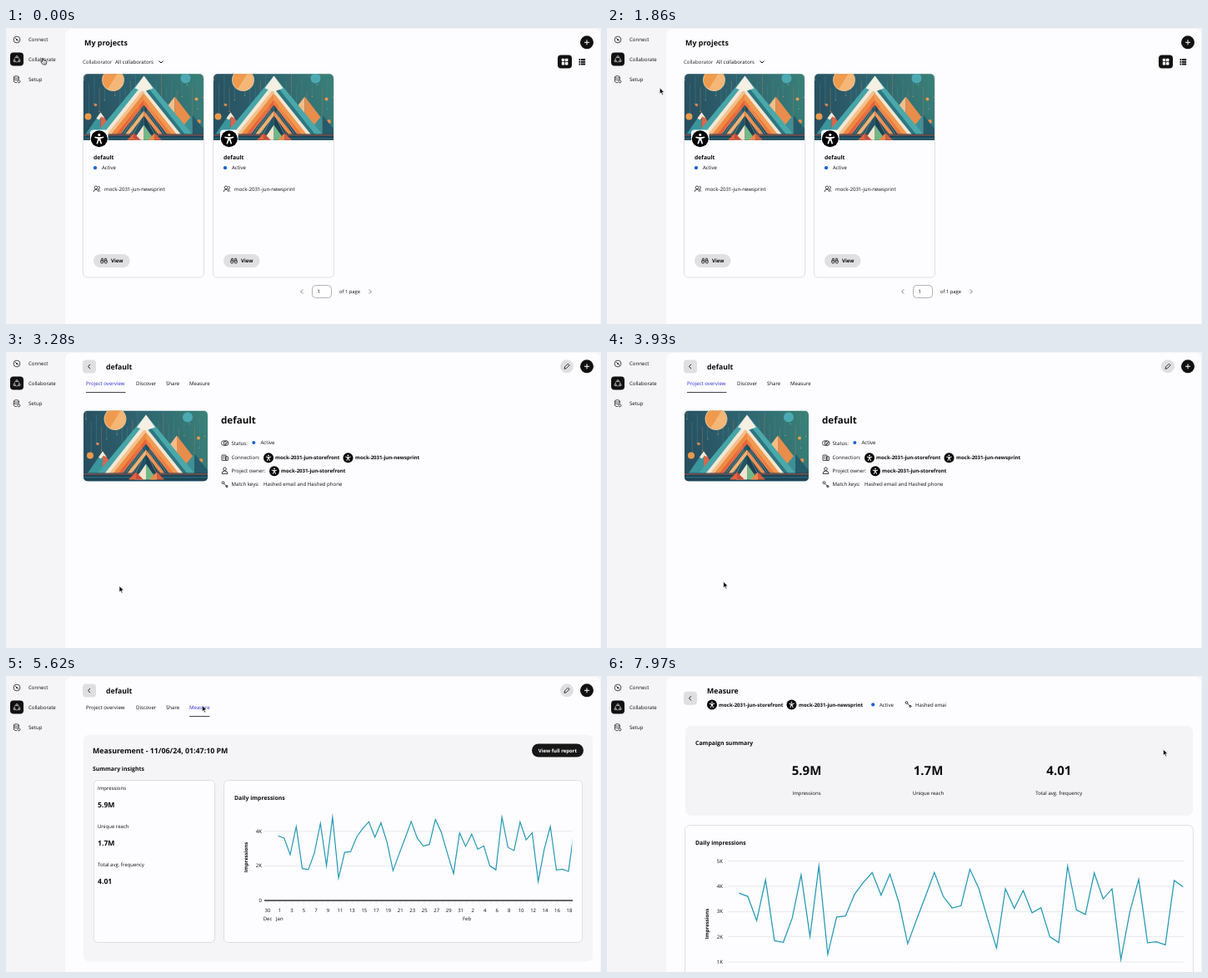
These frames come from a looping animation (714x356 px, 8000 ms). An HTML page with a canvas:

```html
<!DOCTYPE html>
<html lang="en">
<head>
<meta charset="utf-8">
<title>Projects</title>
<style>
html, body { margin: 0; width: 100%; height: 100%; overflow: hidden; background: #f5f4f6; }
canvas { display: block; width: 714px; height: 356px; }
</style>
</head>
<body>
<canvas id="stage"></canvas>
<script>
const LOOP = 8000;
const INK = '#0c0c0c', BLUE = '#2b2bd6', LINE = '#2399b5', DOT = '#1a62d6';
const PUBLISHER = 'mock-2031-jun-newsprint';
const ADVERTISER = 'mock-2031-jun-storefront';

const canvas = document.getElementById('stage');
const ctx = canvas.getContext('2d');
const dpr = window.devicePixelRatio || 1;
canvas.width = 714 * dpr;
canvas.height = 356 * dpr;

// daily impressions, in thousands
const DAILY = [
  3.73, 3.6, 2.64, 4.26, 1.84, 1.78, 2.74, 4.45, 2.02, 4.8, 1.3, 2.78, 2.82,
  3.67, 4.15, 4.54, 3.65, 4.48, 3.37, 1.72, 2.68, 3.6, 4.55, 3.6, 3.14, 3.23,
  4.67, 3.92, 2.7, 1.55, 3.9, 3.12, 3.83, 2.95, 3.15, 2, 1.77, 4.8, 3.06,
  2.88, 4.53, 3.5, 3.9, 1.1, 2.97, 4.27, 1.76, 1.8, 1.68, 4.23, 3.98
];

// ---------- helpers ----------
function text(s, x, cy, size = 6.1, weight = 500, color = INK, align = 'left') {
  ctx.font = `${weight} ${size}px "Open Sans", "Noto Sans", sans-serif`;
  ctx.textRendering = 'geometricPrecision';
  ctx.textAlign = align;
  ctx.fillStyle = color;
  ctx.fillText(s, x, cy + size * 0.357);
}
const bold = (s, x, cy, size = 6.1, color, align) => text(s, x, cy, size, 700, color, align);

function box(x, y, w, h, r, fill, stroke, width = 0.9) {
  ctx.beginPath();
  ctx.roundRect(x, y, w, h, r);
  paint(fill, stroke, width);
}
function disc(x, y, r, fill, stroke, width) {
  ctx.beginPath();
  ctx.arc(x, y, r, 0, Math.PI * 2);
  paint(fill, stroke, width);
}
function paint(fill, stroke, width = 0.8) {
  if (fill) { ctx.fillStyle = fill; ctx.fill(); }
  if (stroke) { ctx.strokeStyle = stroke; ctx.lineWidth = width; ctx.stroke(); }
}
function trace(points, close) {
  ctx.beginPath();
  points.forEach(([x, y], i) => i ? ctx.lineTo(x, y) : ctx.moveTo(x, y));
  if (close) ctx.closePath();
}
function poly(fill, ...points) { trace(points, true); paint(fill); }
function stroke(color, width, ...points) { trace(points); paint(null, color, width); }
function at(x, y, draw) {
  ctx.save();
  ctx.translate(x, y);
  draw();
  ctx.restore();
}

// ---------- icons ----------
function avatar(x, y, r) {
  disc(x, y, r, '#000');
  at(x, y, () => {
    ctx.scale(r / 11.5, r / 11.5);
    ctx.lineCap = ctx.lineJoin = 'round';
    disc(0, -5.4, 1.8, '#fff');
    stroke('#fff', 1.9, [-5.4, -2], [-1.6, -1.2], [1.6, -1.2], [5.4, -2]);
    poly('#fff', [-1.9, -1.8], [1.9, -1.8], [1.9, 2.4], [-1.9, 2.4]);
    stroke('#fff', 1.9, [-1.1, 1.5], [-2.8, 6.3]);
    stroke('#fff', 1.9, [1.1, 1.5], [2.8, 6.3]);
  });
}
function chevron(x, y, dir, color = '#333') {
  stroke(color, 0.9, [x - dir * 1.2, y - 2.6], [x + dir * 1.3, y], [x - dir * 1.2, y + 2.6]);
}
function person(x, y) {
  disc(x, y - 1.7, 1.8, null, INK, 0.8);
  ctx.beginPath();
  ctx.arc(x, y + 4, 3.4, Math.PI, 0);
  ctx.closePath();
  paint(null, INK, 0.8);
}
function people(x, y) {
  disc(x - 1, y - 1.4, 1.8, null, '#222', 0.8);
  ctx.beginPath();
  ctx.arc(x - 1, y + 3.8, 2.9, Math.PI, 0);
  ctx.moveTo(x + 1.6, y - 3);
  ctx.arc(x + 1.7, y - 1.3, 1.7, -1.5, 1.5);
  ctx.lineTo(x + 4, y + 3.4);
  paint(null, '#222', 0.8);
}
function binoculars(x, y) {
  for (const d of [-1, 1]) {
    disc(x + d * 2.3, y + 1.3, 1.6, null, INK, 0.8);
    stroke(INK, 0.8, [x + d * 3.7, y + 0.5], [x + d * 2.7, y - 2.8], [x + d * 1.2, y - 2.8], [x + d * 0.8, y + 1]);
  }
}
function keys(x, y) {
  disc(x - 2, y - 2, 1.4, null, INK, 0.8);
  stroke(INK, 0.8, [x - 1, y - 1], [x + 2.6, y + 2.6]);
  disc(x + 2.5, y + 2.4, 1.1, null, INK, 0.8);
}
function addButton() {
  disc(697, 17.3, 8, '#111');
  stroke('#fff', 1, [694, 17.3], [700, 17.3]);
  stroke('#fff', 1, [697, 14.3], [697, 20.3]);
}
function backButton(y) {
  box(92, y - 8, 16, 16, 4, '#dfdee0');
  chevron(99.8, y, -1, INK);
}
function editButton() {
  disc(673, 17.3, 8, '#dfdee0');
  trace([[670, 20.3], [670.6, 17.9], [674.4, 14.1], [676.2, 15.9], [672.4, 19.7]], true);
  paint(null, INK, 0.8);
}

// ---------- illustration, 149 x 85 ----------
function peak(x, y, half, base, left, right) {
  poly(left, [x, y], [x, base], [x - half, base]);
  poly(right, [x, y], [x + half, base], [x, base]);
}
function artwork(x, y, cropX, cropY, radii) {
  ctx.save();
  ctx.beginPath();
  ctx.roundRect(x + cropX, y + cropY, 149 - cropX * 2, 85 - cropY * 2, radii);
  ctx.clip();
  ctx.translate(x, y);
  const sky = ctx.createLinearGradient(0, 40, 149, 0);
  sky.addColorStop(0, '#274f60');
  sky.addColorStop(0.5, '#2f6570');
  sky.addColorStop(1, '#3a8278');
  ctx.fillStyle = sky;
  ctx.fillRect(0, 0, 149, 85);
  for (let i = 0; i < 24; i++) {
    const lx = 3 + i * 6.2, top = (i * 37) % 23, len = 10 + (i * 29) % 34;
    stroke(i % 3 ? '#4d8b8f' : '#b08058', 0.4, [lx, top], [lx, top + len]);
    disc(lx, top + len, 0.6, i % 2 ? '#e59a62' : '#7cbdbb');
  }
  disc(38, 10, 13.4, '#e9c7a0');
  disc(38, 10, 12.5, '#ef9a4c');
  ctx.beginPath();
  ctx.arc(38, 10, 12.5, -1, 2.1);
  paint('#f4b777');
  disc(125, 8, 6, '#4ca9b3');
  disc(8, 54, 4, '#e99a4c');
  disc(17, 40, 1.8, '#d9844f');
  disc(138, 33, 2, '#e99a4c');
  disc(141, 60, 2.4, '#ec8b4a');

  peak(112, 30, 37, 78, '#f3bd8b', '#e88d4c');
  peak(133, 52, 21, 78, '#3f8f95', '#245c6c');
  peak(23, 49, 20, 78, '#3a959c', '#d9664a');
  poly('#f5e8d8', [23, 49], [28, 56], [24, 54], [21, 58], [18, 56]);

  // nested bands of the main mountain
  peak(75, 5, 62, 80, '#46a5a8', '#4aa8aa');
  peak(75, 13, 53, 80, '#f4e8d6', '#2d7681');
  peak(75, 20, 48, 80, '#f3c08c', '#f4e6d2');
  peak(75, 26, 43, 80, '#ee8a42', '#f09a50');
  peak(75, 34, 37, 80, '#e5623c', '#ed7a40');
  peak(75, 40, 32, 80, '#245a6b', '#1e4c60');
  peak(75, 47, 26, 80, '#f2b376', '#ee8846');
  peak(75, 53, 21, 80, '#215466', '#1b4255');
  poly('#f6efe4', [75, 5], [86, 20], [75, 24], [64, 20]);
  for (let i = 0; i < 6; i++) {
    stroke('#f1b071', 0.4, [47 + i * 3, 76], [69 + i, 42 + i * 2]);
    stroke('#efc69a', 0.4, [103 - i * 3, 76], [81 - i, 42 + i * 2]);
  }
  ctx.fillStyle = '#1e4557';
  ctx.fillRect(0, 75, 149, 10);
  ctx.fillStyle = '#cf5b45';
  ctx.fillRect(0, 76, 149, 0.8);
  ctx.fillStyle = '#3b8890';
  ctx.fillRect(0, 80, 149, 0.7);
  peak(75, 64, 13, 83, '#f2e4d0', '#72b887');
  peak(63, 74, 9, 83, '#e5643f', '#c94e3c');
  peak(88, 74, 9, 83, '#ed8a4b', '#d85e3e');
  ctx.restore();
}

// ---------- pages ----------
function shell() {
  ctx.fillStyle = '#f5f4f6';
  ctx.fillRect(0, 0, 714, 356);
  box(70.6, 0.5, 643, 380, 8, '#fdfcff', '#f0eff1', 0.5);

  disc(13, 14, 3.9, null, '#222', 0.8);
  stroke('#222', 0.8, [10.8, 11.8], [15.2, 16.2]);
  disc(13, 14, 1, '#222');
  text('Connect', 27, 14);

  box(5, 29.5, 16, 16, 4, '#111');
  disc(13, 38, 3.1, null, '#bbb', 0.7);
  for (const [x, y] of [[13, 34.7], [15.9, 39.6], [10.1, 39.6]]) disc(x, y, 1.1, '#111', '#fff', 0.7);
  text('Collaborate', 27, 38);

  ctx.beginPath();
  ctx.ellipse(12.4, 59, 3, 1.3, 0, 0, Math.PI * 2);
  ctx.moveTo(9.4, 59);
  ctx.lineTo(9.4, 64.4);
  ctx.quadraticCurveTo(11, 66, 13, 65.6);
  ctx.moveTo(9.4, 61.8);
  ctx.quadraticCurveTo(12, 63.4, 15.4, 61.8);
  ctx.lineTo(15.4, 59);
  paint(null, '#222', 0.8);
  disc(15.4, 64.4, 1.5, '#f5f4f6', '#222', 0.8);
  text('Setup', 27, 62);
}

function projectCard(x, hover) {
  box(x + 0.5, 55.5, 145, 244.5, 5, '#fdfcff', '#dcdbdf');
  artwork(x - 1.5, 52.5, 2.5, 2.8, [5, 5, 0, 0]);
  box(x + 9, 122.5, 21.5, 21.5, 4, '#fff');
  avatar(x + 19.8, 133.2, 10);
  bold('default', x + 13, 155.5, 6.8);
  disc(x + 15, 168.2, 2.1, DOT);
  text('Active', x + 23, 168.2);
  people(x + 17, 193.3);
  text(PUBLISHER, x + 26, 193.5);
  box(x + 13, 272, 43.5, 16, 8, hover ? '#c6c5c8' : '#e0dfe2');
  binoculars(x + 25.5, 280);
  bold('View', x + 34, 280);
}

function projectsPage(t) {
  bold('My projects', 94, 17.5, 8.95);
  text('Collaborator', 92, 41.2, 6.1, 400, '#222');
  text('All collaborators', 131, 41);
  stroke(INK, 1, [183.6, 39.6], [186, 42], [188.4, 39.6]);
  addButton();

  box(662, 32.5, 17, 16, 4, '#111');
  for (const x of [666.8, 671]) for (const y of [36.8, 41]) box(x, y, 3.4, 3.4, 0.5, '#fff');
  for (const y of [37, 39.8, 42.6]) {
    box(687.5, y, 1.7, 1.9, 0.3, INK);
    box(689.8, y, 5.4, 1.9, 0.3, INK);
  }

  const [cx, cy] = pointer(t);
  projectCard(92, cx > 105 && cx < 148 && cy > 272 && cy < 288);
  projectCard(248, false);

  chevron(355, 317, -1, '#777');
  box(367.5, 309.5, 23, 15, 4, '#fff', '#a0a0a2', 0.8);
  text('1', 373.5, 317.2);
  text('of 1 page', 400, 317.2, 5.8);
  chevron(437, 317, 1, '#777');
}

function projectHeader(active) {
  backButton(17.5);
  bold('default', 120, 17.5, 8.7);
  editButton();
  addButton();
  const tabs = [['Project overview', 96, 143.5], ['Discover', 156, 180], ['Share', 192, 208], ['Measure', 220, 244.3]];
  tabs.forEach(([name, x, end], i) => {
    text(name, x, 37.5, 6.1, 500, i === active ? BLUE : INK);
    if (i === active) {
      ctx.fillStyle = '#4b4b4b';
      ctx.fillRect(x, 48, end - x, 1.1);
    }
  });
}

function overviewPage() {
  projectHeader(0);
  artwork(93, 70.5, 0, 0, 5);
  bold('default', 258, 81.5, 11.6);

  disc(264, 109.6, 2.9, null, INK, 0.8);
  disc(261.4, 109.6, 2.9, null, INK, 0.7);
  stroke(INK, 0.8, [262.6, 109.6], [263.8, 110.8], [265.8, 108.4]);
  text('Status:', 270.5, 110);
  disc(297.3, 109, 2, DOT);
  text('Active', 305.5, 109);

  box(259, 124, 4.8, 6.4, 0.6, null, INK, 0.8);
  box(263.8, 125.8, 2.6, 4.6, 0.4, null, INK, 0.8);
  stroke(INK, 0.7, [260.2, 126], [262.6, 126]);
  stroke(INK, 0.7, [260.2, 128], [262.6, 128]);
  text('Connection:', 270.5, 127.3);
  avatar(315, 127.2, 6);
  bold(ADVERTISER, 323, 127.3);
  avatar(410.5, 127.2, 6);
  bold(PUBLISHER, 419, 127.3);

  person(262.5, 142.4);
  text('Project owner:', 270.5, 143.3);
  avatar(322, 143.2, 6);
  bold(ADVERTISER, 330, 143.3);

  keys(262.5, 159.2);
  text('Match keys:', 270.5, 159.3);
  text('Hashed email and Hashed phone', 309, 159.3);
}

function plot(x0, step, y0, perK, width) {
  trace(DAILY.map((v, i) => [x0 + i * step, y0 - v * perK]));
  ctx.lineJoin = 'miter';
  ctx.lineCap = 'butt';
  paint(null, LINE, width);
}
function axisTitle(x, y) {
  at(x, y, () => {
    ctx.rotate(-Math.PI / 2);
    bold('Impressions', 0, 0, 6, INK, 'center');
  });
}

function measurePage() {
  projectHeader(3);
  box(93, 70.5, 611, 273, 7, '#f5f4f6');
  bold('Measurement - 11/06/24, 01:47:10 PM', 104, 89.8, 8.8);
  box(631, 81.5, 62, 16, 8, '#161616');
  bold('View full report', 662, 89.5, 6, '#fff', 'center');
  bold('Summary insights', 104, 112, 6.9);

  box(105.5, 125.5, 145, 195, 5, '#fdfcff', '#dcdbdf');
  [['Impressions', '5.9M'], ['Unique reach', '1.7M'], ['Total avg. frequency', '4.01']].forEach(([name, value], i) => {
    text(name, 110, 135.3 + i * 46, 6);
    bold(value, 110, 154.5 + i * 46, 8.65);
  });

  box(261.5, 125.5, 430, 195, 5, '#fdfcff', '#dcdbdf');
  bold('Daily impressions', 274, 146.5, 6.9);
  ['0', '2K', '4K'].forEach((s, i) => {
    const y = 270 - i * 41.7;
    text(s, 307, y, 6.1, 500, INK, 'right');
    if (i) stroke('#e4e4e6', 0.8, [310, y], [680, y]);
  });
  ctx.save();
  ctx.beginPath();
  ctx.rect(310, 150, 369.3, 130);
  ctx.clip();
  plot(326.5, 7.26, 270, 20.85, 1.2);
  ctx.restore();
  stroke('#333', 1.4, [310, 270], [680, 270]);
  for (let i = 0; i <= 50; i++) stroke('#cfcfd2', 0.5, [314 + i * 7.24, 271], [314 + i * 7.24, 273.5]);
  for (let i = 0; i <= 25; i++) {
    const day = new Date(2023, 11, 30 + i * 2).getDate();
    text(String(day), 314 + i * 14.48, 282, 6, 500, INK, 'center');
  }
  text('Dec', 314, 292, 6, 500, INK, 'center');
  text('Jan', 328.3, 292, 6, 500, INK, 'center');
  text('Feb', 553, 292, 6, 500, INK, 'center');
  axisTitle(288, 218);
}

function reportPage() {
  backButton(26.8);
  bold('Measure', 120, 17.8, 8.75);
  avatar(126, 34.4, 6);
  bold(ADVERTISER, 134, 34.4);
  avatar(221.5, 34.4, 6);
  bold(PUBLISHER, 230, 34.4);
  disc(319.2, 34.4, 2.1, DOT);
  text('Active', 327, 34.4);
  keys(361.5, 34);
  text('Hashed emai', 370, 34.4);

  box(94, 60, 609, 108, 7, '#f4f3f5');
  bold('Campaign summary', 106, 81, 6.95);
  [['5.9M', 'Impressions', 239.5], ['1.7M', 'Unique reach', 385.5], ['4.01', 'Total avg. frequency', 542.3]].forEach(([value, name, x]) => {
    bold(value, x, 114, 15, INK, 'center');
    text(name, x, 140.5, 6, 500, INK, 'center');
  });

  box(93.5, 179.5, 610, 220, 6, '#fdfcff', '#dcdbdf');
  bold('Daily impressions', 106, 200.5, 6.9);
  for (let k = 1; k <= 5; k++) {
    const y = 374.3 - k * 30.35;
    text(k + 'K', 139, y, 6.1, 500, INK, 'right');
    stroke('#e2e2e4', 0.8, [145, y], [692, y]);
  }
  plot(158.3, 10.66, 374.3, 30.35, 1.25);
  axisTitle(120, 298);
}

// ---------- pointer ----------
// time, x, y of the tip
const PATH = [
  [0, 43.5, 36], [380, 28, 25.5], [800, 37, 38], [1140, 38.5, 38.5], [1450, 39.5, 39],
  [1700, 53, 42], [2420, 134, 277.5], [2620, 135.5, 281.5], [3340, 136, 281.5],
  [3800, 139.7, 276.3], [4220, 140, 276.5], [4900, 235, 35.5], [5830, 235.5, 35.5],
  [6620, 615, 73.5], [6760, 621.5, 75], [6900, 624, 76], [7350, 667.5, 88.3], [8000, 667.5, 88.3]
];
function pointer(t) {
  const i = Math.max(1, PATH.findIndex(p => p[0] > t));
  const [t0, x0, y0] = PATH[i - 1], [t1, x1, y1] = PATH[i];
  const u = (t - t0) / (t1 - t0), e = u * u * (3 - 2 * u);
  return [x0 + (x1 - x0) * e, y0 + (y1 - y0) * e];
}
function arrow() {
  trace([[0, 0], [0, 7.2], [1.7, 5.7], [2.9, 8.4], [4.1, 7.9], [2.9, 5.3], [5.2, 5.1]], true);
  paint('#000', '#fff', 0.6);
}
function hand() {
  ctx.beginPath();
  ctx.moveTo(0, 4.6);
  ctx.lineTo(0, 0.6);
  ctx.quadraticCurveTo(0.7, -0.5, 1.4, 0.6);
  ctx.lineTo(1.4, 3);
  ctx.lineTo(4.6, 3.6);
  ctx.quadraticCurveTo(5.6, 4, 5.3, 5.4);
  ctx.lineTo(4.5, 8);
  ctx.lineTo(0.9, 8);
  ctx.lineTo(-1.7, 4.9);
  ctx.quadraticCurveTo(-1.4, 3.7, 0, 4.8);
  ctx.closePath();
  ctx.lineJoin = 'round';
  paint('#fff', '#111', 0.8);
  for (const x of [1.5, 2.6, 3.7]) stroke('#111', 0.4, [x, 5], [x, 6.8]);
}

// ---------- timeline ----------
const PAGES = [[7700, reportPage], [5350, measurePage], [2950, overviewPage], [0, projectsPage]];

function frame(now) {
  const t = now % LOOP;
  ctx.setTransform(dpr, 0, 0, dpr, 0, 0);
  ctx.lineCap = 'butt';
  ctx.lineJoin = 'miter';
  shell();
  PAGES.find(p => t >= p[0])[1](t);
  const [x, y] = pointer(t);
  at(x, y, x < 71 && y < 50 ? hand : arrow);
  requestAnimationFrame(frame);
}
requestAnimationFrame(frame);
</script>
</body>
</html>
```
